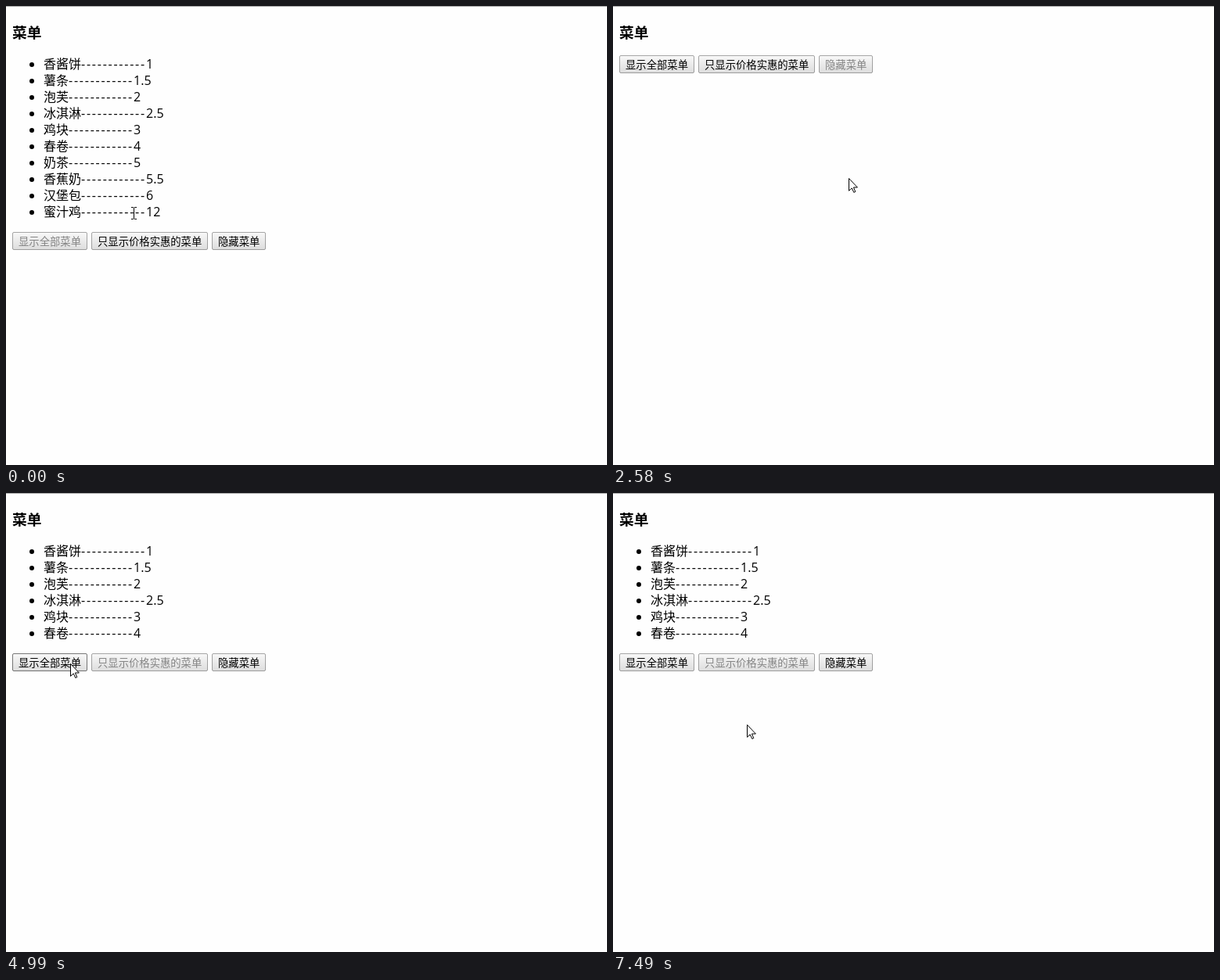
An HTML page for the animation above (8000 ms loop, 768 by 587 pixels).

```html
<!DOCTYPE html>
<html lang="zh-CN">
<head>
<meta charset="utf-8">
<title>菜单</title>
<style>
html, body { margin: 0; height: 100%; overflow: hidden; background: #fefefe; }
svg { display: block; font: 16px "Noto Sans CJK SC", "Noto Sans CJK", sans-serif; }
.title { font-size: 18.72px; font-weight: bold; }
.dashes { font-family: "Open Sans", sans-serif; letter-spacing: 1.76px; }
.price { font-family: "Open Sans", sans-serif; }
.button { font-size: 13.333px; }
.button rect { fill: url(#up); stroke: #000; stroke-opacity: .34; }
.button.hover rect { stroke-opacity: .52; }
.button.pressed rect { fill: url(#down); }
.button.disabled text { fill: #848484; }
</style>
</head>
<body>
<svg width="768" height="587" viewBox="0 0 768 587">
  <defs>
    <linearGradient id="up" x2="0" y2="1">
      <stop stop-color="#f8f8f8"/><stop offset="1" stop-color="#ddd"/>
    </linearGradient>
    <linearGradient id="down" x2="0" y2="1">
      <stop stop-color="#ddd"/><stop offset="1" stop-color="#f4f4f4"/>
    </linearGradient>
  </defs>
  <rect width="768" height="1" fill="#aaa"/>
  <text class="title" x="8" y="40.5">菜单</text>
  <g id="list"></g>
  <g id="bar"></g>
  <path id="arrow" d="M.5 .5V16.3L4.2 12.9 6.8 18.4 8.8 17.5 6.4 12H11.4Z" fill="#fff" stroke="#000"/>
  <path id="beam" d="M-3 -6.5H0M1 -6.5H4M.5 -6V8M-3 8.5H0M1 8.5H4" fill="none" stroke="#000" shape-rendering="crispEdges"/>
</svg>
<script>
const LOOP = 8000, TICK = 130, TOP = 64, ROW = 21, HEIGHT = 23;
const foods = [["香酱饼", 1], ["薯条", 1.5], ["泡芙", 2], ["冰淇淋", 2.5], ["鸡块", 3],
  ["春卷", 4], ["奶茶", 5], ["香蕉奶", 5.5], ["汉堡包", 6], ["蜜汁鸡", 12]];

const buttons = [
  { label: "显示全部菜单", rows: foods.length },
  { label: "只显示价格实惠的菜单", rows: foods.filter(([, price]) => price < 5).length },
  { label: "隐藏菜单", rows: 0 }];

// time of release, button, time held
const clicks = [[0, 0, 0], [980, 1, 0], [2580, 2, 150], [3920, 1, 120], [5390, 0, 0], [7490, 1, 130]];

// first step, last step, end point
const START = [163, 264];
const glides = [
  [130, 130, 166, 272], [280, 430, 177, 306], [1510, 1870, 255, 235], [2020, 2020, 301, 220],
  [3270, 3270, 284, 209], [3420, 3660, 185, 78], [3920, 3920, 187, 78], [4480, 4990, 82, 218],
  [6410, 6660, 128, 249], [6810, 7210, 171, 296]];

const get = id => document.getElementById(id);
const show = (el, on) => el.setAttribute("visibility", on ? "visible" : "hidden");
const move = (el, x, y) => el.setAttribute("transform", `translate(${x} ${y})`);

// The pointer slows down along each glide, moving once per tick.
function pointer(t) {
  let [x, y] = START;
  for (const [first, last, endX, endY] of glides) {
    if (t < first) break;
    const gaps = Math.round((last - first) / TICK);
    const done = gaps ? Math.min(gaps, Math.floor((t - first) / (last - first) * gaps)) : 0;
    const ease = 1 - (1 - (done + 1) / (gaps + 1)) ** 2;
    x += (endX - x) * ease;
    y += (endY - y) * ease;
  }
  return [Math.round(x), Math.round(y)];
}

get("list").innerHTML = foods.map(([name, price], i) => {
  const y = TOP + i * ROW + 16, x = 48 + name.length * 16;
  return `<g><circle cx="33" cy="${y - 5}" r="3"/><text x="48" y="${y}">${name}<tspan class="dashes" x="${x}">${"-".repeat(12)}</tspan><tspan class="price" x="${x + 83}">${price}</tspan></text></g>`;
}).join("");

let left = 8;
for (const b of buttons) {
  b.x = left;
  b.w = Math.floor(16 + b.label.length * 40 / 3);
  left += b.w + 5;
}
get("bar").innerHTML = buttons.map(({ label, x, w }) =>
  `<g><rect x="${x + .5}" y=".5" width="${w - 1}" height="${HEIGHT - 1}" rx="1.5"/><text x="${x + 8}" y="17">${label}</text></g>`
).join("");

const rows = [...get("list").children], boxes = [...get("bar").children];

function draw() {
  const t = performance.now() % LOOP;
  const active = clicks.findLast(([time]) => time <= t)[1];
  const count = buttons[active].rows;
  const bottom = TOP + count * ROW;
  const barY = count ? bottom + 15 : 63;
  const [x, y] = pointer(t);

  rows.forEach((row, i) => show(row, i < count));
  move(get("bar"), 0, barY);
  boxes.forEach((box, i) => {
    const b = buttons[i], off = i === active;
    const hover = !off && x >= b.x && x < b.x + b.w && y >= barY && y < barY + HEIGHT;
    const held = clicks.some(([time, n, hold]) => n === i && t >= time - hold && t < time);
    box.setAttribute("class", "button" + (off ? " disabled" : "") +
      (hover ? " hover" : "") + (held ? " pressed" : ""));
  });

  const onText = x >= 48 && x < 190 && y >= TOP && y < bottom;
  show(get("beam"), onText);
  show(get("arrow"), !onText);
  move(get(onText ? "beam" : "arrow"), x, y);
  requestAnimationFrame(draw);
}
draw();
</script>
</body>
</html>
```
